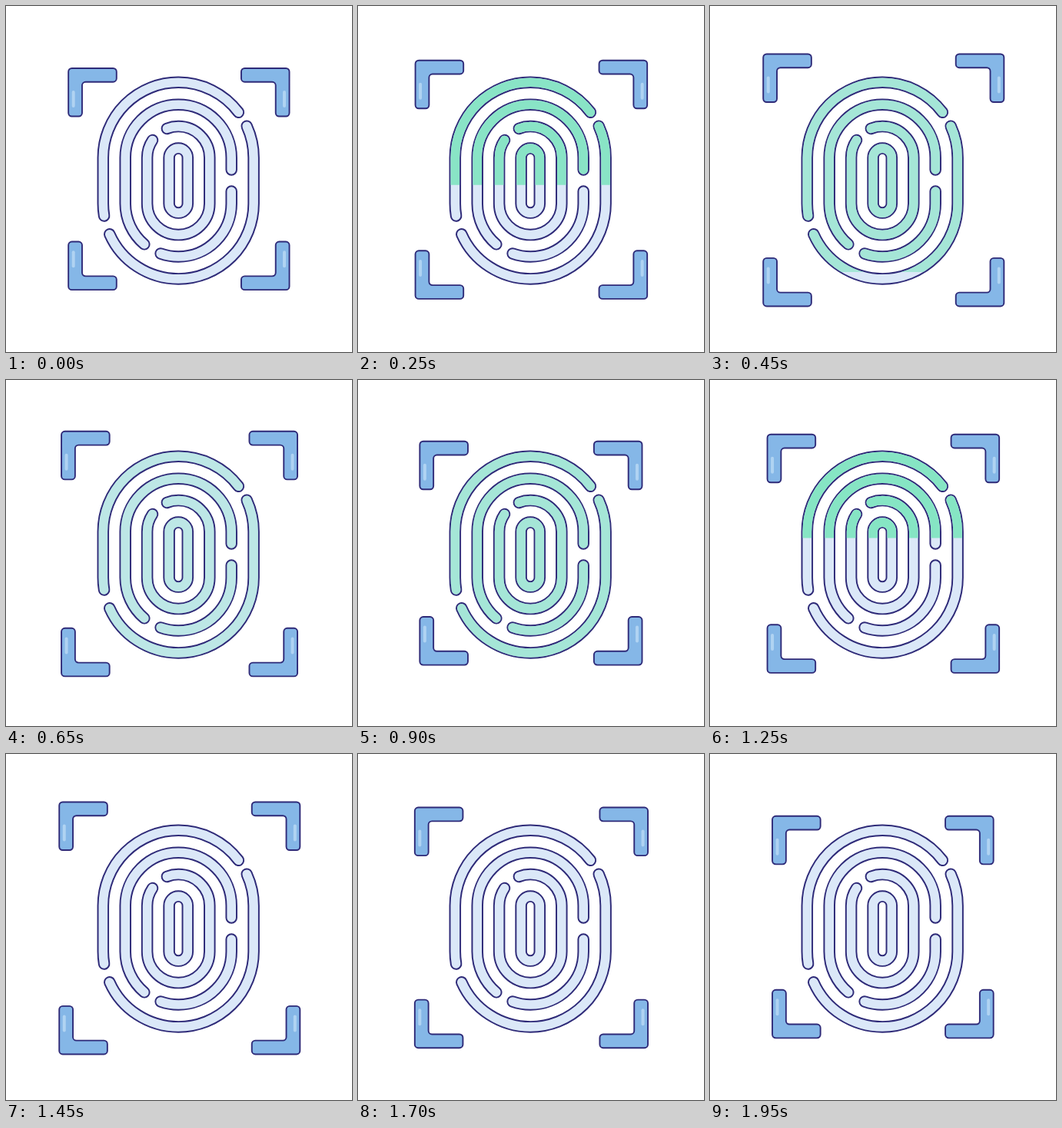
These frames come from a looping animation (450 by 450 pixels, 2 s). An HTML page with a canvas:

```html
<!DOCTYPE html>
<html lang="en">
<head>
<meta charset="utf-8">
<title>Fingerprint scan</title>
<style>
  html, body { margin: 0; width: 100%; height: 100%; overflow: hidden; background: #fff; }
  canvas { display: block; width: 450px; height: 450px; }
</style>
</head>
<body>
<canvas id="stage"></canvas>
<script>
const LOOP = 2000, STEP = 50;
const INK = '#2e2a78', PALE = '#dbe8f8', GREEN = '#86e5c4', BLUE = '#85b7e7', SHINE = '#b0d3f2';
const CX = 224.2, TOP = 197.2, BOTTOM = 257;   // centres of the ridge arcs
const PRINT_TOP = 91, PRINT_BOTTOM = 363;

const canvas = document.getElementById('stage');
const ctx = canvas.getContext('2d');
const ratio = window.devicePixelRatio || 1;
canvas.width = canvas.height = 450 * ratio;

const rad = deg => deg * Math.PI / 180;
const clamp = (v, lo, hi) => Math.min(hi, Math.max(lo, v));
const wave = phase => (1 - Math.cos(2 * Math.PI * phase)) / 2;

function makeRidges() {
  const path = new Path2D();
  const upper = (r, from, to, ccw) => path.arc(CX, TOP, r, rad(from), rad(to), ccw);
  const lower = (r, from, to, ccw) => path.arc(CX, BOTTOM, r, rad(from), rad(to), ccw);
  const start = (cy, r, deg) =>
    path.moveTo(CX + r * Math.cos(rad(deg)), cy + r * Math.sin(rad(deg)));

  const [a, b, c, d] = [97.9, 69, 40.6, 12.1];

  start(BOTTOM, a, 170.6);
  lower(a, 170.6, 180);
  upper(a, 180, 323);

  start(TOP, a, -24.7);
  upper(a, -24.7, 0);
  lower(a, 0, 156);

  start(BOTTOM, b, 130);
  lower(b, 130, 180);
  upper(b, 180, 360);
  path.lineTo(CX + b, 213);

  path.moveTo(CX + b, 241);
  lower(b, 0, 109.6);

  start(TOP, c, 214);
  upper(c, 214, 180, true);
  lower(c, 180, 0, true);
  upper(c, 0, -111.5, true);

  start(TOP, d, 180);
  upper(d, 180, 360);
  lower(d, 0, 180);
  path.closePath();
  return path;
}

function makeBracket(size, thick, r) {
  const path = new Path2D();
  const corners = [[size, 0], [size, thick], [thick, thick], [thick, size], [0, size], [0, 0]];
  path.moveTo(size / 2, 0);
  corners.forEach(([x, y], i) => {
    const [nx, ny] = corners[(i + 1) % corners.length];
    path.arcTo(x, y, nx, ny, r);
  });
  path.closePath();
  return path;
}

const ridges = makeRidges();
const bracket = makeBracket(62.6, 17.8, 4.5);

function band(color, width) {
  ctx.strokeStyle = color;
  ctx.lineWidth = width;
  ctx.stroke(ridges);
}

function drawPrint(t) {
  ctx.lineCap = 'round';
  ctx.lineJoin = 'round';
  band(INK, 15.5);
  band(PALE, 11.6);

  // green sweeps down, dims and brightens, then withdraws upwards
  const reach = t < 975 ? clamp(t / 480, 0, 1) : 1 - clamp((t - 975) / 475, 0, 1);
  if (reach <= 0) return;
  ctx.save();
  ctx.beginPath();
  ctx.rect(0, PRINT_TOP, 450, (PRINT_BOTTOM - PRINT_TOP) * reach);
  ctx.clip();
  const dim = t > 175 && t < 1175 ? wave((t - 175) / 1000) : 0;
  ctx.globalAlpha = 1 - 0.65 * dim;
  band(GREEN, 11.6);
  ctx.restore();
}

function drawBracket(x, y, sx, sy) {
  ctx.save();
  ctx.translate(x, y);
  ctx.scale(sx, sy);
  ctx.fillStyle = BLUE;
  ctx.fill(bracket);
  ctx.strokeStyle = INK;
  ctx.lineWidth = 1.9;
  ctx.stroke(bracket);
  ctx.strokeStyle = SHINE;
  ctx.lineWidth = 4;
  ctx.lineCap = 'round';
  ctx.beginPath();
  ctx.moveTo(6.5, 31);
  ctx.lineTo(6.5, 49);
  ctx.stroke();
  ctx.restore();
}

function drawBrackets(t) {
  const k = wave((t + 15) / 1000);
  const left = 81.2 - 12.1 * k, right = 368.5 + 14 * k;
  const top = 81 - 18.8 * k, bottom = 369.1 + 21.6 * k;
  drawBracket(left, top, 1, 1);
  drawBracket(right, top, -1, 1);
  drawBracket(left, bottom, 1, -1);
  drawBracket(right, bottom, -1, -1);
}

function draw() {
  const t = Math.floor((performance.now() + 8) / STEP) * STEP % LOOP;
  ctx.setTransform(ratio, 0, 0, ratio, 0, 0);
  ctx.fillStyle = '#fff';
  ctx.fillRect(0, 0, 450, 450);
  drawPrint(t);
  drawBrackets(t);
  requestAnimationFrame(draw);
}
draw();
</script>
</body>
</html>
```
